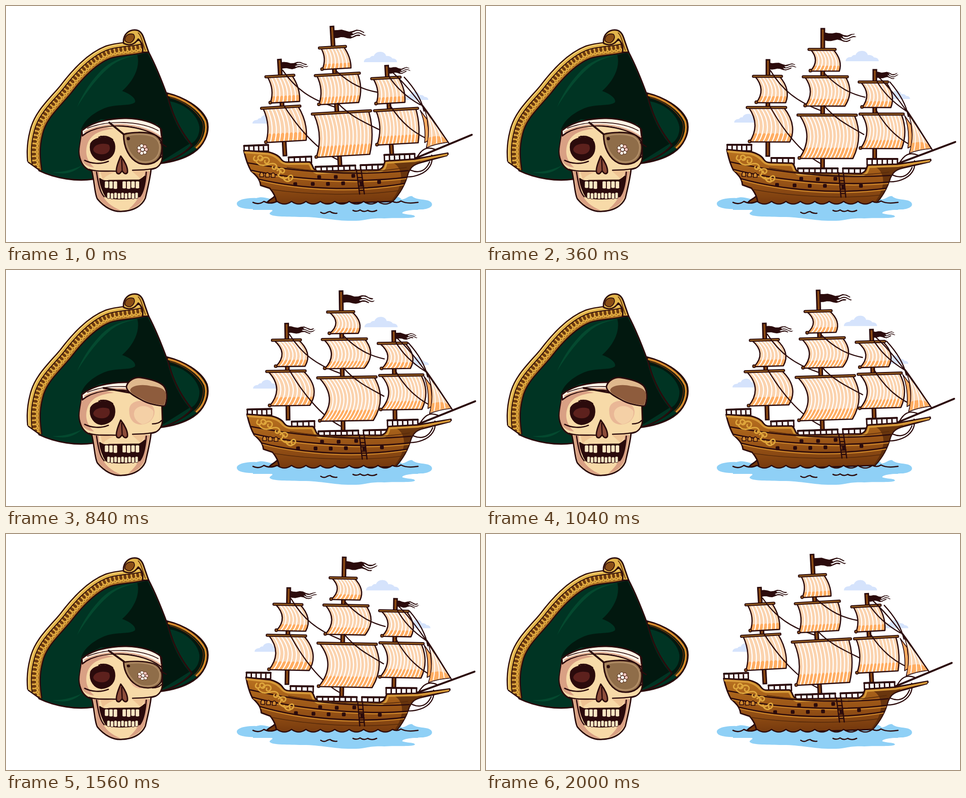
Animation of 1000x500 px, one loop 2.04 s. Source, as an HTML page:

```html
<!DOCTYPE html>
<html lang="en">
<head>
<meta charset="utf-8">
<title>Pirate skull and ship</title>
<style>
  html, body { margin: 0; width: 100%; height: 100%; overflow: hidden; background: #fff; }
  svg { display: block; width: 100vw; height: 100vh; }
  path, line, ellipse { stroke-linecap: round; stroke-linejoin: round; }
  .ink { stroke: #2b0b0c; stroke-width: 3; }
  .line { fill: none; stroke: #2b0b0c; stroke-width: 2.6; }
  .thin { stroke-width: 1.7; }
  .thick { stroke-width: 4; }
  .dark { fill: #2b0b0c; }
  .shade { fill: #d9a084; }
  .rope { fill: none; stroke: #2b0b0c; stroke-width: 2.4; }
  .gold { fill: none; stroke: #dfa63c; stroke-width: 3; }
</style>
</head>
<body>
<svg viewBox="0 0 1000 500">
  <defs>
    <linearGradient id="wood" x1="0" y1="0" x2="0" y2="1">
      <stop offset="0" stop-color="#b9721f"/><stop offset=".55" stop-color="#9a5517"/><stop offset="1" stop-color="#74380d"/>
    </linearGradient>
    <g id="cloud"><path d="M0,0 C0,-6 5,-9 12,-9 C15,-13 18,-14 21,-13 C24,-24 44,-26 47,-13 C56,-14 59,-9 60,-8 C67,-8 70,-4 70,0Z"/></g>
    <clipPath id="hullClip"><use href="#hullShape"/></clipPath>
    <clipPath id="trimClip"><path d="M0,0H320V352H76L40,326H0Z"/></clipPath>
  </defs>

  <g id="hat">
    <path class="ink" fill="#02180f" d="M338,184 C375,193 412,214 424,242 C432,270 415,298 395,311 C375,324 350,331 322,334Z"/>
    <path fill="#003423" d="M346,202 C380,208 404,232 408,256 C409,276 398,288 391,291 C370,268 356,238 346,202Z"/>
    <path fill="#003423" d="M395,298 C418,285 424,265 421,250 C428,274 412,298 392,309 C376,320 352,328 334,330 C360,322 380,312 395,298Z"/>
    <path fill="none" stroke="#d98a2c" stroke-width="4" d="M343,189 C376,197 408,218 420,244 C426,266 416,288 402,300"/>
    <path fill="none" stroke="#5c2d0b" stroke-width="2" d="M346,194 C374,201 403,221 415,246 C420,264 411,286 398,299"/>
    <path class="ink" fill="#003423" d="M300,96 C318,130 333,170 342,195 C352,235 372,270 392,295 C375,315 345,330 325,333 L183,367 C150,372 105,366 70,349 C56,320 62,270 85,232 C120,172 185,88 300,96Z"/>
    <path fill="#02180f" d="M298,99 C316,130 331,170 340,195 C350,235 368,270 387,292 L330,328 L320,250 L200,240 L158,262 C165,240 190,222 215,214 C240,208 262,212 272,204 C275,196 262,186 245,180 C268,160 284,130 277,104Z"/>
    <path fill="#04492f" d="M274,105 C240,108 215,120 196,142 C176,163 160,190 150,214 C172,178 196,148 220,128 C236,115 254,109 274,105Z"/>
    <path fill="#04492f" d="M98,352 C125,352 142,346 160,338 C142,354 124,358 98,352Z"/>
    <path class="line" d="M342,195 C352,235 372,270 390,291"/>
    <g id="trim" clip-path="url(#trimClip)"></g>
    <path class="line" d="M47,331 L72,349"/>
    <path class="ink" fill="#e3b54b" d="M248,79 C246,60 260,49 275,51 C287,53 290,66 293,75 L301,98 L288,98 C290,86 286,76 279,70 C270,84 258,84 248,79Z"/>
    <path class="ink thin" fill="#8a4f16" d="M251,73 C250,62 260,57 269,60 C274,66 269,75 262,78 C256,78 253,77 251,73Z"/>
    <path fill="none" stroke="#6b390f" stroke-width="2" d="M279,57 C285,62 286,72 294,94"/>
  </g>

  <g id="skull">
    <path class="ink" fill="#f7daa8" d="M160,264 C159,288 151,305 156,322 C161,340 171,347 181,349 C187,372 187,400 193,409 C207,426 226,437 245,435 C270,434 287,423 294,407 C299,385 304,366 306,346 C320,345 330,334 330,318 L328,262 C290,240 200,240 160,264Z"/>
    <path class="shade" d="M160,268 C159,288 152,305 157,320 C162,337 175,341 186,342 C170,328 166,310 172,292 C180,270 200,263 228,260 C205,254 178,257 160,268Z"/>
    <path class="shade" d="M184,350 C190,375 189,398 195,408 C210,425 226,434 242,433 C222,425 208,413 203,398 C199,380 196,365 196,351Z"/>
    <path class="shade" d="M303,350 C298,375 296,395 291,407 C284,420 272,428 258,431 C278,414 284,399 287,380 L293,350Z"/>
    <path fill="#eec394" d="M198,347 L234,350 C218,356 207,362 204,369Z M266,350 L294,348 L285,367Z"/>
    <path class="ink" fill="#2b0b0c" d="M179,292 C184,282 198,279 211,279 C224,280 230,287 229,302 C228,319 214,326 201,327 C188,326 175,312 179,292Z"/>
    <path fill="#5d211d" d="M184,304 C186,292 206,289 217,294 C222,303 217,312 206,314 C195,315 185,311 184,304Z"/>
    <path class="line" d="M196,278 C205,274 216,276 225,283 M166,327 C180,334 200,336 216,329 M175,346 C193,352 214,349 233,350 M267,348 C285,347 300,348 316,343 M309,326 C318,326 324,324 328,319 M200,276 L208,279"/>
    <path class="ink" fill="#8d4d3a" d="M242,318 C236,332 230,348 234,354 C239,358 242,353 245,349 C248,354 252,358 256,353 C258,343 250,328 242,318Z"/>
    <path class="line" d="M244,325 L245,347"/>
    <path class="ink" fill="#2b0b0c" d="M198,366 C204,371 210,372 218,370 L281,369 C286,368 290,363 293,361 C292,380 288,398 279,404 C260,410 228,410 211,404 C205,394 200,382 198,366Z"/>
    <path class="line" d="M191,352 C195,378 198,394 207,404 M296,352 C294,376 290,396 282,404"/>
    <g id="teeth" fill="#fbe8c4" stroke="#2b0b0c" stroke-width="1"></g>
    <path fill="#e9b796" d="M260,300 C258,281 276,275 293,278 C309,282 318,296 311,311 C304,327 283,332 270,323 C263,317 260,309 260,300Z"/>
    <path fill="#f4d0a6" d="M272,297 C280,284 302,286 311,299 C313,314 302,324 288,327 C274,322 266,309 272,297Z"/>
    <path class="ink" fill="#fff4e6" d="M160,264 C180,247 210,239 250,238 C285,238 313,247 326,259 L329,283 C302,259 245,249 205,256 C188,259 173,265 161,275Z"/>
    <path fill="none" stroke="#dfae91" stroke-width="3" d="M166,267 C196,251 245,247 282,257 C303,263 317,270 326,277"/>
    <path class="line thin" d="M172,259 C215,241 283,243 321,264"/>
    <path id="strap" class="line thick"/>
    <g id="patchShut">
      <path class="ink" fill="#8f6d49" d="M248,272 C262,267 295,266 312,272 C330,280 332,300 326,318 C318,335 297,338 280,333 C260,324 248,300 248,272Z"/>
      <path fill="none" stroke="#b18d66" stroke-width="3" d="M252,276 C267,271 293,270 309,276 C326,284 327,300 321,315 C314,330 297,333 282,329 C264,321 253,300 252,276Z"/>
      <g id="flower"></g>
      <circle class="dark" cx="258" cy="281" r="3.5"/>
      <path class="line" d="M326,290 L338,298"/>
    </g>
    <g id="patchOpen">
      <path class="ink" fill="#dfb88d" d="M254,247 C257,234 272,226 284,228 C303,231 323,236 332,245 C341,254 341,275 335,288 C322,288 302,284 289,277 C274,269 254,259 254,247Z"/>
      <path fill="#8e5c3d" d="M262,254 C264,245 286,241 306,246 C326,248 336,252 338,264 C338,274 336,281 333,286 C320,286 302,282 290,275 C276,267 262,262 262,254Z"/>
    </g>
  </g>

  <g id="clouds" fill="#d5e3fc">
    <use href="#cloud" x="755" y="119"/>
    <use href="#cloud" transform="translate(520 249) scale(.84)"/>
    <use href="#cloud" transform="translate(835 199) scale(.8)"/>
  </g>
  <path fill="#8fd0f6" d="M487,420 C485,410 510,406 528,407 C545,402 552,410 570,410 L812,411 C820,401 828,403 835,410 C846,408 850,401 857,403 C865,412 890,408 897,416 C904,425 889,431 875,431 C855,432 836,434 836,439 C846,443 861,441 863,446 C860,451 825,448 798,450 C765,448 755,456 735,455 C690,456 665,446 620,447 C590,446 560,447 556,440 C557,435 568,434 558,431 C530,430 490,433 487,420Z"/>

  <g id="ship">
    <g id="rig"></g>
    <g>
      <path class="ink thin" fill="#ffad62" d="M883,232 C891,252 893,276 890,301 L901,295 L897,252Z"/>
      <path class="ink thin" fill="#fbd3ae" d="M889,222 C901,252 902,282 893,312 C909,306 925,303 940,302 C922,273 905,245 889,222Z"/>
      <path fill="#ffad62" d="M898,291 C911,287 922,287 932,293 L938,301 C921,303 908,305 895,310Z"/>
      <path fill="none" stroke="#fff" stroke-width="2" d="M897,240 C907,265 908,286 903,306 M905,251 C914,274 917,288 915,303 M914,264 C922,279 925,291 926,301"/>
      <path class="rope" d="M826,148 C858,179 882,212 941,304 M852,161 C871,183 886,207 891,234 M872,333 C882,316 893,308 911,316 M808,346 C816,370 850,378 877,368 C897,361 907,345 904,328 M846,350 C866,367 888,367 899,342"/>
      <path class="line thick" d="M868,334 L990,288 M862,345 L938,327"/>
    </g>
    <g id="rails"></g>
    <path class="ink" fill="#74380d" d="M574,397 C570,407 560,408 553,416 L560,423 L580,423Z"/>
    <path id="hullShape" class="ink" fill="url(#wood)" d="M508,304 L560,309 C574,313 582,318 586,325 C590,331 594,332 602,332 L646,333 C653,337 650,348 661,353 L790,355 C800,353 802,346 805,337 L868,335 L938,325 L936,330 L880,343 C862,347 858,354 853,364 C846,388 835,406 818,423 L574,423 C573,410 571,400 560,386 L541,379 C540,368 536,361 522,348 C515,335 511,320 508,304Z"/>
    <g clip-path="url(#hullClip)">
      <path fill="#56290a" opacity=".75" d="M812,337 C852,348 842,400 806,430 L860,430 L880,338Z"/>
      <path fill="none" stroke="#d69a39" stroke-width="4" d="M508,308 L558,313 C573,317 579,323 584,329 C590,335 596,336 602,336 L644,337 C650,342 648,353 660,357 L792,359 C804,357 806,349 808,341 L869,339 L936,328"/>
      <path class="line" d="M514,330 C600,349 720,368 853,359 M521,346 C600,367 740,383 849,373 M538,366 C625,390 740,400 845,386"/>
      <path fill="none" stroke="#cd872b" stroke-width="2" d="M522,349 C600,370 740,386 849,376 M540,369 C625,393 740,403 842,389"/>
      <path fill="none" stroke="#572a0b" stroke-width="1.5" d="M560,388 C640,403 750,410 838,400 M598,343 C690,360 780,362 850,352"/>
      <path class="gold" d="M531,317 c-8,8 4,14 7,6 c-3,-6 5,-10 9,-3 c3,6 -5,9 -7,5 M544,324 c10,-8 20,-2 16,6 c-4,6 -11,2 -8,-3 M534,329 c6,10 20,9 29,5 c12,-2 16,6 11,11 c-5,3 -9,-2 -6,-5 M573,342 c12,3 11,12 6,17 M577,349 c9,-8 19,-3 14,4 c-3,3 -7,1 -6,-3 M578,358 c8,10 17,11 23,4 c6,-6 11,2 6,7 c-4,4 -8,0 -6,-4 M589,363 c1,9 10,12 14,8"/>
      <path class="ink thin" fill="#d28a2f" d="M540,361 v-6 q4,-7 8,0 v6Z M552,362 v-6 q4,-7 8,0 v6Z M564,363 v-6 q4,-7 8,0 v6Z"/>
      <g id="ports"></g>
    </g>
    <path class="line" d="M744,353 L749,405 M754,353 L759,405 M745,361 h10 M746,370 h10 M747,379 h10 M748,388 h10 M748,397 h10"/>
  </g>

  <path id="front" fill="#8fd0f6"/>
  <path id="waterline" class="line"/>
  <path id="ripples" class="line" d="M664,437 q7,5 14,0 q7,-3 8,0 q6,3 12,2 M732,433 q8,4 15,-1 q8,6 16,1 q9,5 19,0"/>
</svg>

<script>
const LOOP = 2040, STEP = 40, TAU = Math.PI * 2;
const $ = id => document.getElementById(id);
const mix = (a, b, f) => a + (b - a) * f;
const clamp = (n, low, high) => Math.min(high, Math.max(low, n));
const smooth = (a, b, t) => {
  const u = clamp((t - a) / (b - a), 0, 1);
  return u * u * (3 - 2 * u);
};
const fixed = n => n.toFixed(1);
const range = n => [...Array(n).keys()];
const transform = (id, value) => $(id).setAttribute('transform', value);

// Gold braid follows the hat's edge.
function buildTrim() {
  const guide = document.createElementNS('http://www.w3.org/2000/svg', 'path');
  const d = 'M293,84 C262,92 238,90 215,98 C180,112 150,145 125,178 C100,208 72,232 64,268 C57,295 57,318 62,350';
  guide.setAttribute('d', d);
  const length = guide.getTotalLength();
  const at = (distance, side) => {
    const s = clamp(distance, 1, length - 1);
    const a = guide.getPointAtLength(s - 1), b = guide.getPointAtLength(s + 1);
    const h = Math.hypot(b.x - a.x, b.y - a.y);
    return `${fixed((a.x + b.x) / 2 + side * (b.y - a.y) / h)},${fixed((a.y + b.y) / 2 - side * (b.x - a.x) / h)}`;
  };
  const offset = side => 'M' + range(60).map(i => at(i / 59 * length, side)).join('L');
  const stroke = (path, color, width) => `<path d="${path}" fill="none" stroke="${color}" stroke-width="${width}" style="stroke-linecap:butt"/>`;
  // The strip on the outer side is plain; the loops lie inside it.
  const outer = -1;
  const loops = range(Math.floor(length / 9)).map(i => {
    const s = i * 9;
    return `M${at(s, -9 * outer)}Q${at(s + 15, -6 * outer)} ${at(s + 10, 4 * outer)}M${at(s + 11, -9 * outer)}Q${at(s - 2, -5 * outer)} ${at(s + 3, 4 * outer)}`;
  }).join('');
  $('trim').innerHTML = stroke(d, '#2b0b0c', 30) + stroke(d, '#6d3b10', 25) +
    stroke(loops, '#e0a93f', 2.8) + stroke(offset(-11 * outer), '#b67a28', 2.5) +
    stroke(offset(9 * outer), '#e3b54b', 7) + stroke(offset(5 * outer), '#2b0b0c', 1.8) + stroke(offset(11 * outer), '#f6d987', 1.5);
}

function buildDetails() {
  const tooth = (x, y, w, h) => `<rect x="${x}" y="${y}" width="${w}" height="${h}" rx="2.5"/>`;
  $('teeth').innerHTML =
    range(8).filter(i => i !== 3).map(i => tooth(208 + i * 9.3, 371, 8.4, 15 + (i % 3))).join('') +
    range(9).map(i => tooth(213 + i * 7.4, 395 + (i % 2), 6.6, 13)).join('');

  $('flower').innerHTML = range(7).map(i => {
    const a = i / 7 * TAU;
    return `<circle cx="${288 + 8 * Math.cos(a)}" cy="${304 + 8 * Math.sin(a)}" r="3.8" fill="${i % 3 ? '#fff5e8' : '#f2c3bb'}" stroke="#4a2416"/>`;
  }).join('') + '<circle cx="288" cy="304" r="4" fill="#fff" stroke="#4a2416"/>';

  $('rails').innerHTML = [[509, 294, 51, 5], [602, 322, 48, 4], [658, 344, 84, 7], [753, 344, 49, 4], [804, 324, 64, 6]]
    .map(([x, y, w, n]) => `<path class="ink" fill="#fff" d="M${x},${y}h${w}v13h${-w}Z` +
      range(n).map(i => `M${x + i * w / n},${y}v12`).join('') + `"/><path class="line thick" d="M${x},${y}h${w}"/>`).join('');

  $('ports').innerHTML = [[665, 366], [700, 367], [737, 366], [614, 379], [651, 380], [683, 381], [715, 381], [754, 383], [791, 381]]
    .map(([x, y]) => `<rect class="dark" x="${x - 4}" y="${y - 4}" width="8" height="8" rx="2"/>`).join('');

  const scallops = 'M521,416 q12,6 23,-2 q13,7 28,0' + 'q15.2,11 30.4,0'.repeat(8) + 'q10,5 18,-1 q12,7 36,3';
  $('waterline').setAttribute('d', scallops);
  $('front').setAttribute('d', scallops + 'V432H521Z');
}

// Sail: yard from x0 to x1 at y0, foot from xa to xb at y1, belly depth at each edge.
function sail([x0, x1, y0, xa, xb, y1, left, right], billow) {
  const top = f => mix(x0 + 5, x1 - 6, f), foot = f => mix(xa, xb, f);
  const belly = f => mix(left, right, f) * billow, midY = (y0 + y1) / 2;
  const point = (f, u) => `${fixed(mix(top(f), foot(f), u) + belly(f) * 4 * u * (1 - u))},${fixed(mix(y0, y1, u))}`;
  const curve = f => `Q${fixed((top(f) + foot(f)) / 2 + 2 * belly(f))},${midY} `;
  const n = Math.round((x1 - x0) / 9);
  const side = f => `M${fixed(top(f))},${y0}${curve(f)}${fixed(foot(f))},${y1}`;
  const shape = `${side(0)}L${xb},${y1}${curve(1)}${top(1)},${y0}Z`;
  const hem = 'M' + range(2 * n + 1).map(i => point(i / 2 / n, i % 2 ? .74 : .79)).join('L') +
    'L' + [.88, 1].map(u => point(1, u)).join('L') + 'L' + [1, .88].map(u => point(0, u)).join('L') + 'Z';
  const stripes = range(n - 1).map(i => side((i + 1) / n)).join('');
  return `<path fill="#fbd3ae" d="${shape}"/><path fill="#ffad62" d="${hem}"/>
    <path fill="none" stroke="#fff" stroke-width="2.3" d="${stripes}"/><path class="line" d="${shape}"/>
    <circle class="ink thin" fill="#87501a" cx="${xa}" cy="${y1 - 1}" r="3"/>
    <path class="line" style="stroke-width:6.5" d="M${x0 + 2},${y0}H${x1 - 2}"/><path fill="none" stroke="#99601f" stroke-width="2.5" d="M${x0 + 2},${y0}H${x1 - 2}"/>`;
}

// Three ragged tails on a waving cloth.
function flag(x, y, w, h, phase) {
  const wave = f => .2 * h * Math.sqrt(f) * Math.sin(phase - f * 12) + .15 * h * f;
  const edge = (a, b, level) => range(9).map(i => {
    const f = mix(a, b, i / 8);
    return `${fixed(x + f * w)},${fixed(y + h * level(f) + wave(f))}`;
  }).join('L');
  return `<path class="dark" d="M${edge(0, .95, f => .2 * f)}L${edge(.93, .55, f => .3)}L${edge(.6, 1, f => .5)}L${edge(.95, .5, f => .62)}L${edge(.55, .82, f => .78)}L${edge(.8, 0, f => 1 - .1 * f)}Z"/>`;
}

const masts = [
  { x: 594.5, top: 114, base: 318, flag: [597, 120, 58, 14], rope: 'M600,137 C625,178 655,202 705,221 M599,213 C625,260 663,310 705,333',
    sails: [[562, 625, 149, 570, 632, 205, 13, 10], [549, 634, 215, 556, 641, 288, 14, 13]] },
  { x: 710, top: 48, base: 352, flag: [714, 56, 67, 17], rope: 'M713,142 C742,172 768,186 799,193 M713,211 C738,241 768,255 797,272',
    sails: [[679, 738, 92, 684, 745, 138, 12, 8], [667, 764, 150, 673, 757, 212, 13, 11], [656, 783, 231, 661, 774, 323, 18, 12]] },
  { x: 820, top: 135, base: 332, flag: [823, 139, 47, 13], rope: 'M823,157 C838,184 858,204 886,222 M822,219 C846,262 875,286 909,301',
    sails: [[785, 849, 161, 793, 854, 215, 13, 9], [787, 882, 229, 790, 877, 302, 14, 8]] }
];

function mast(m, lean, billow, phase) {
  return `<g transform="rotate(${lean} ${m.x} ${m.base})">
    <rect class="ink" fill="#8b4a14" x="${m.x - 3.5}" y="${m.top}" width="7" height="${m.base - m.top}"/>
    ${flag(...m.flag, phase)}${m.sails.map(s => sail(s, billow)).join('')}<path class="rope" d="${m.rope}"/></g>`;
}

function drawShip(t) {
  const slow = t / LOOP * TAU, fast = slow * 2;
  const pitch = (1 - Math.cos(fast)) / 2, swell = (1 - Math.cos(slow)) / 2;
  const drift = 5 * swell + 1.8 * Math.sin(slow) - 3;
  transform('ship', `translate(${drift} 0) rotate(${2.58 * (pitch - .8)} 567 400)`);
  const lean = .191 * (6 * pitch + 8 * swell - 6.5);
  const billow = .5 + .25 * pitch + .65 * swell;
  $('rig').innerHTML = masts.map((m, i) => mast(m, lean, billow, fast + i)).join('');
  transform('clouds', `translate(${4.5 * pitch} ${-2.5 * Math.sin(fast)})`);
}

function drawPatch(t) {
  const lift = smooth(390, 630, t) - smooth(1300, 1620, t);
  const turn = 1 - 2 * lift;
  const fold = (x, y, angle, k) => `translate(${x} ${y}) rotate(${angle}) scale(1 ${k}) rotate(${-angle}) translate(${-x} ${-y})`;
  $('patchShut').style.display = turn > 0 ? '' : 'none';
  $('patchOpen').style.display = turn > 0 ? 'none' : '';
  transform('patchShut', fold(248, 271, 14, Math.max(.1, turn)));
  transform('patchOpen', fold(262, 262, 20, Math.max(.2, -turn)));
  $('strap').setAttribute('d', `M${mix(218, 206, lift)},${mix(247, 250, lift)} L${mix(251, 262, lift)},${mix(274, 260, lift)}`);
}

function frame(now) {
  const t = Math.floor(now % LOOP / STEP) * STEP;
  drawShip(t);
  drawPatch(t);
  requestAnimationFrame(frame);
}

buildTrim();
buildDetails();
frame(0);
</script>
</body>
</html>
```
